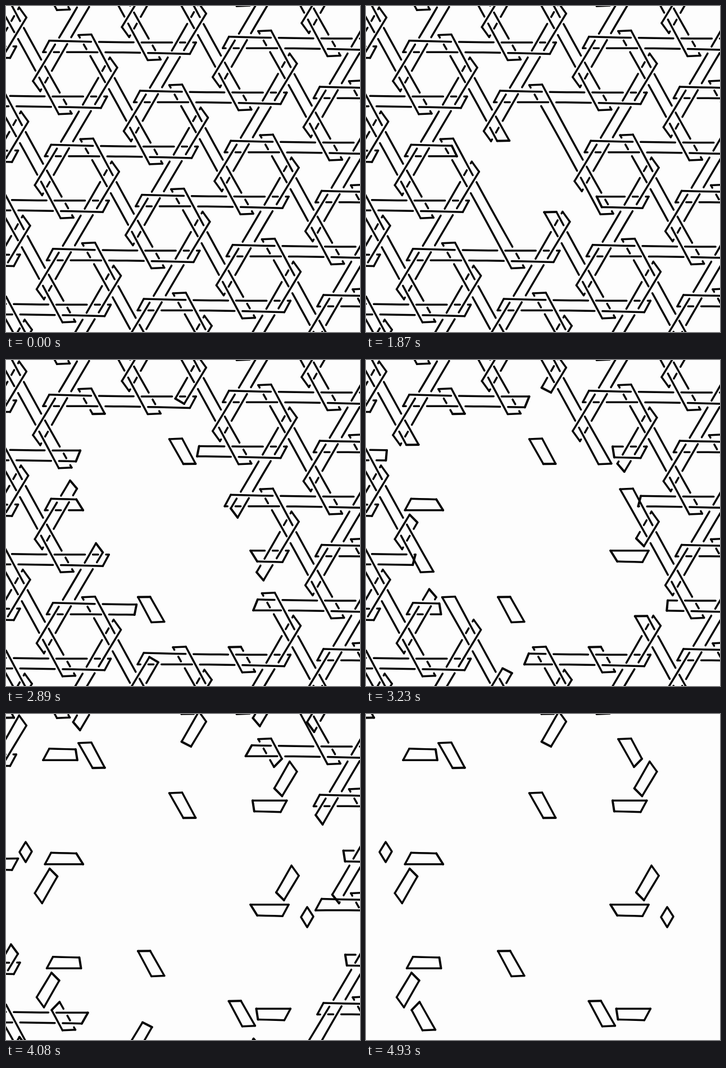
Animation of 630 by 581 pixels, one loop 5100 ms. Source, as an HTML page with a canvas:

```html
<!DOCTYPE html>
<html lang="en">
<head>
<meta charset="utf-8">
<title>Unravelling weave</title>
<style>
  html, body { margin: 0; width: 100%; height: 100%; overflow: hidden; background: #fdfdfd; }
  canvas { display: block; }
</style>
</head>
<body>
<canvas id="stage" width="630" height="581"></canvas>
<script>
const ctx = document.getElementById('stage').getContext('2d');
const STEP = 170, STEPS = 30;
const LINE = 3.5, CUT_LINE = 4, HALO = 7, WAIST = 1.2;

const add = (a, b, k = 1) => [a[0] + b[0] * k, a[1] + b[1] * k];
const wedge = (a, b) => a[0] * b[1] - a[1] * b[0];

// Rings sit on a slightly turned triangular lattice.
const ORIGIN = [284.5, 211], P = [158.3, -96.3], Q = [3.3, 185.5];
const ring = (i, j) => add(add(ORIGIN, P, i), Q, j);
const MIDDLE = add(ORIGIN, Q, 0.5);

// A strip joins a ring to the one at step d; o and i are its outer and inner corners.
const kinds = {
  flat: { o: [-46, -60], i: [-57, -39.5], d: [1, 0], keep: [47, 61] },
  down: { o: [29, -71], i: [6, -70], d: [1, 1], keep: [51, 51] },
  up: { o: [75, -12], i: [62, -30], d: [0, 1], keep: [51, 55] }
};
const names = Object.keys(kinds);
for (const k of Object.values(kinds)) {
  const span = add(add([0, 0], P, k.d[0]), Q, k.d[1]);
  const run = add(add(span, k.o, -1), k.i, -1);
  k.len = Math.hypot(...run);
  k.dir = [run[0] / k.len, run[1] / k.len];
  k.inward = [-k.dir[1], k.dir[0]];
}

// The six strip ends met clockwise around a ring.
const ends = [0, 1, 2, 3, 4, 5].map(e => {
  const name = names[e % 3], k = kinds[name], side = e < 3 ? 0 : 1, sign = side ? -1 : 1;
  const flip = v => [v[0] * sign, v[1] * sign];
  return { name, side, o: flip(k.o), i: flip(k.i), dir: flip(k.dir) };
});

// Breaks in each line: a strip passes over the inner line of the
// hooking end that crosses it, then under its outer line.
ends.forEach((end, e) => {
  const next = ends[(e + 1) % 6], prev = ends[(e + 5) % 6];
  const under = (mine, other, line) => {
    const gap = add(other[line], end[mine], -1), det = wedge(end.dir, other.dir);
    return { at: wedge(gap, other.dir) / det, other, line, t: wedge(gap, end.dir) / det };
  };
  end.breaks = {
    o: [under('o', next, 'o')],
    i: [under('i', prev, 'o'), under('i', prev, 'i'), under('i', next, 'o')]
  };
});

const strips = new Map();
const keyOf = (name, i, j) => name + i + ',' + j;

function strip(name, i, j) {
  const key = keyOf(name, i, j);
  if (!strips.has(key)) {
    const d = kinds[name].d;
    const away = (a, b) => Math.hypot(...add(ring(a, b), MIDDLE, -1));
    const side = away(i + d[0], j + d[1]) > away(i, j) ? 1 : 0;
    strips.set(key, { side, start: 24, dur: 4.5, keep: [0, 0] });
  }
  return strips.get(key);
}

// Schedules a strip and its half-turn twin; side is the end that stays.
function cut(name, i, j, side, start, extra) {
  const { d, keep } = kinds[name];
  const plan = { start, dur: 4.5, keep, ...extra };
  strips.set(keyOf(name, -i - d[0], 1 - j - d[1]), { ...plan, side: 1 - side });
  strips.set(keyOf(name, i, j), { ...plan, side });
}

cut('up', 0, 0, 0, 99, { gone: 3, heal: 5 });
cut('flat', -1, 0, 0, 6.2, { keep: [45, 68], dur: 5.5 });
cut('down', -1, -1, 0, 10);
cut('down', 0, 0, 0, 12.3);
cut('up', 0, -1, 0, 13, { keep: [52, 62] });
cut('up', -1, -1, 1, 14);
cut('flat', 0, 0, 1, 14.9, { dur: 4 });
cut('up', -1, 0, 1, 15.8);
cut('flat', 1, 2, 1, 16, { gone: 27 });
cut('flat', 1, 1, 1, 17, { gone: 27 });
cut('flat', -1, -1, 0, 18);
cut('down', 1, 2, 1, 18);
cut('down', 1, 1, 1, 19.3, { keep: [113, 113], dur: 3.5, gone: 23 });
cut('down', 1, 0, 0, 19.5, { keep: [41, 57], dur: 4 });
cut('down', 0, -1, 0, 19.5);
cut('down', -1, -2, 0, 19.5);
cut('up', 0, -2, 0, 19.5);
cut('up', 1, -1, 0, 21);
cut('up', 1, 2, 1, 21);
cut('up', 2, 1, 0, 22);
cut('up', 2, 0, 0, 23.1);
cut('flat', 1, 0, 1, 23.3, { keep: [0, 0] });
cut('up', 2, -1, 0, 23.6);
cut('up', 2, 2, 0, 24);
cut('down', 0, -2, 1, 99);
cut('flat', -2, -2, 1, 99);
strip('up', 0, 1).gone = 27;

// Visible stretch of one long line, measured from the strip's first end.
function stretch(name, s, line, n, gone = s.gone) {
  if (n >= gone) return [1, 0];
  const len = kinds[name].len;
  const p = Math.min(1, Math.max(0, (n - s.start) / s.dur));
  const left = len + (s.keep[line === s.side ? 0 : 1] - len) * p;
  return s.side ? [len - left, len] : [0, left];
}

// Whether a line of the strip ending at ring i, j still reaches distance t from there.
function covers({ name, side }, i, j, line, t, n) {
  const { d, len } = kinds[name];
  const s = side ? strip(name, i - d[0], j - d[1]) : strip(name, i, j);
  const [a, b] = stretch(name, s, line === 'o' ? side : 1 - side, n, s.heal || s.gone);
  const at = side ? len - t : t;
  return at >= a && at <= b;
}

function stroke(points, width) {
  ctx.lineWidth = width;
  ctx.beginPath();
  points.forEach(p => ctx.lineTo(...p));
  ctx.stroke();
}

function drawStrip(name, i, j, n) {
  const k = kinds[name], s = strip(name, i, j), home = ring(i, j);
  const spans = [0, 1].map(line => stretch(name, s, line, n));
  if (spans.some(([a, b]) => b - a < 2)) return;

  // Strips are a little slimmer halfway along.
  const at = (line, t) => {
    const pinch = WAIST * Math.sin(Math.PI * t / k.len) * (line ? -1 : 1);
    return add(add(add(home, line ? k.i : k.o), k.dir, t), k.inward, pinch);
  };
  const run = (line, from, to) => {
    const parts = Math.ceil((to - from) / 20), points = [];
    for (let q = 0; q <= parts; q++) points.push(at(line, from + (to - from) * q / parts));
    stroke(points, LINE);
  };

  spans.forEach(([a, b], line) => {
    const gaps = [];
    for (const side of [0, 1]) {
      const end = ends[names.indexOf(name) + 3 * side];
      const ri = i + k.d[0] * side, rj = j + k.d[1] * side;
      for (const g of end.breaks[line === side ? 'o' : 'i']) {
        if (covers(g.other, ri, rj, g.line, g.t, n)) gaps.push(side ? k.len - g.at : g.at);
      }
    }
    gaps.sort((x, y) => x - y);
    let from = a;
    for (const gap of [...gaps, b + HALO]) {
      const to = Math.min(gap - HALO, b);
      if (to - from > 1) run(line, from, to);
      from = Math.max(from, gap + HALO);
    }
  });

  for (const e of [0, 1]) {
    const isCut = n > s.start && e !== s.side;
    stroke([at(0, spans[0][e]), at(1, spans[1][e])], isCut ? CUT_LINE : LINE);
  }
}

function diamond(x, y) {
  stroke([[x, y - 18], [x + 11, y - 1], [x, y + 18], [x - 11, y], [x, y - 18]], LINE);
}

function draw(n) {
  ctx.fillStyle = '#fdfdfd';
  ctx.fillRect(0, 0, 630, 581);
  ctx.strokeStyle = '#060606';
  ctx.lineCap = ctx.lineJoin = 'round';
  for (let i = -4; i <= 3; i++)
    for (let j = -5; j <= 5; j++)
      for (const name of names) drawStrip(name, i, j, n);
  if (n >= 23) {
    diamond(536, 362);
    diamond(35, 246);
  }
}

const begin = performance.now();
let shown = -1;
function tick(now) {
  const n = Math.floor(Math.max(0, now - begin) / STEP) % STEPS;
  if (n !== shown) draw(shown = n);
  requestAnimationFrame(tick);
}
tick(begin);
</script>
</body>
</html>
```
